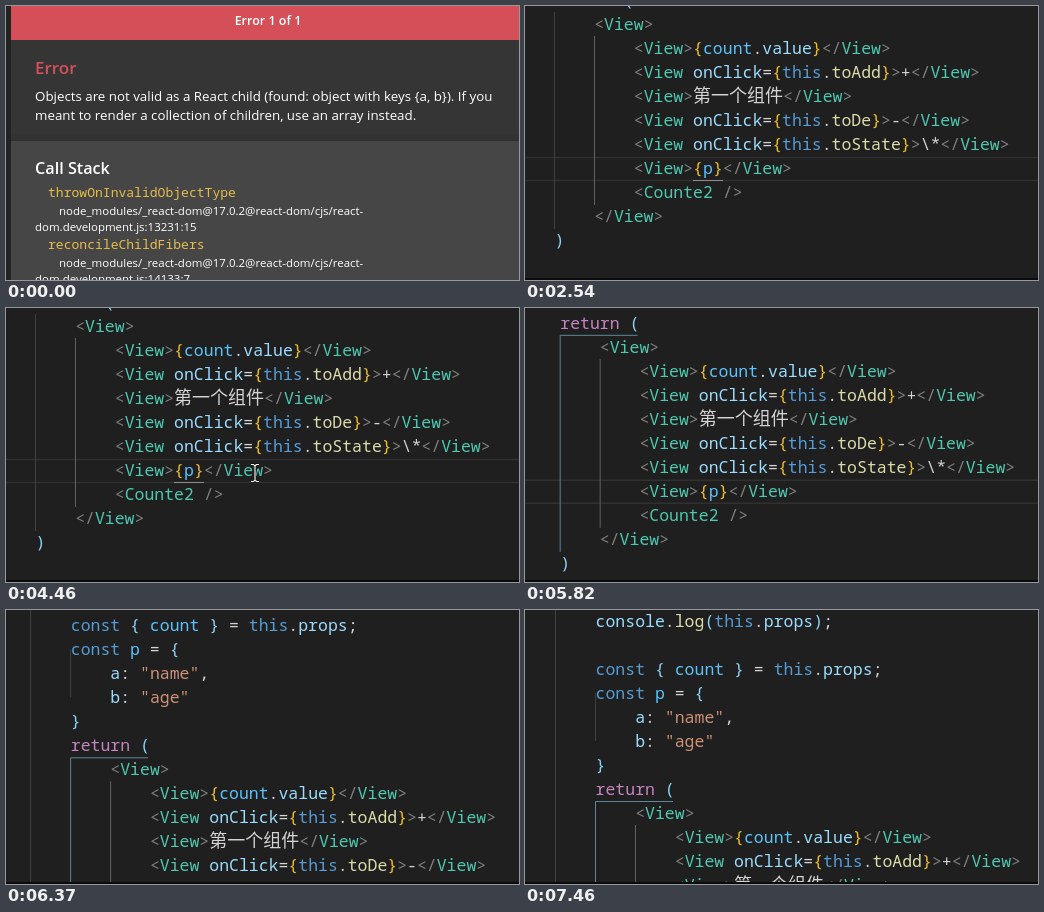
Write an HTML page that moves like this. It is 513 px wide and 274 px high and loops after 8320 ms.

```html
<!DOCTYPE html>
<html lang="en">
<head>
<meta charset="utf-8">
<title>Invalid child error</title>
<style>
  html, body { margin: 0; width: 100%; height: 100%; overflow: hidden; background: #1f1f1f; }
  svg { display: block; width: 513px; height: 274px; }
  text { white-space: pre; }
  .sans { font-family: "Open Sans", "Noto Sans", sans-serif; fill: #fff; }
  .mono { font-family: "Noto Sans Mono", "DejaVu Sans Mono", monospace; }
  .cjk { font-family: "Noto Sans CJK SC", "Noto Sans CJK", sans-serif; font-size: 18px; }
  .bold { font-weight: 600; }
  .body { font-size: 13.33px; }
  .path { font-size: 11.47px; }
  .call { font-size: 13.06px; fill: #e6bd4e; }
  .code { font-size: 16.49px; }
</style>
</head>
<body>
<svg viewBox="0 0 513 274">
  <defs>
    <linearGradient id="edge" x2="0" y2="1">
      <stop stop-color="#353535"/><stop offset="1" stop-color="#303030"/>
    </linearGradient>
  </defs>

  <g id="error">
    <rect width="513" height="274" fill="#464646"/>
    <rect y="34" width="513" height="101" fill="#353535"/>
    <rect y="127" width="513" height="8" fill="url(#edge)"/>
    <rect width="513" height="34" fill="#d44f58"/>
    <rect width="5" height="274" fill="#232323"/>
    <g class="sans">
      <text class="bold" x="262" y="18.5" font-size="12.5" text-anchor="middle">Error 1 of 1</text>
      <text class="bold" x="29" y="68" font-size="17" style="fill:#d4505a">Error</text>
      <text class="body" x="29" y="95">Objects are not valid as a React child (found: object with keys {a, b}). If you</text>
      <text class="body" x="29" y="113.5">meant to render a collection of children, use an array instead.</text>
      <text class="bold" x="29" y="168" font-size="16.2">Call Stack</text>
    </g>
    <g id="stack"></g>
  </g>

  <g id="editor">
    <rect width="513" height="274" fill="#1f1f1f"/>
    <g id="page">
      <path d="M-60 151.5H560M-60 174.5H560" stroke="#303030" stroke-width="1.5"/>
      <path d="M-10.5 -260V290M29.5 -102V-54" stroke="#404040"/>
      <path d="M69.5 30V199" stroke="#626262"/>
      <path id="outer" d="M29.5 6V223" stroke="#404040"/>
      <path id="inner" d="M168 174.5H198" stroke="#8a8a8a"/>
      <path id="active" d="M107 6.5H29.5V223" fill="none" stroke="#5d8797"/>
      <g id="code" class="mono code"></g>
    </g>
    <rect y="272" width="513" height="2" fill="#0b0b0b"/>
    <g id="strip">
      <rect y="269" width="513" height="5" fill="#0b0b0b"/>
      <path d="M0 270.5H390" stroke="#4c211d"/>
      <path d="M216 273H238M266 273H288M296 273H320M345 273H370" stroke="#d9d0c8" stroke-width="2"/>
      <path d="M190 274Q201 268 212 274" fill="#eee" stroke="#c4783a"/>
    </g>
  </g>

  <path id="arrow" d="M.5 .5V15L4 11.7 6.3 17 8.6 16 6.3 10.8H11Z" fill="#fff" stroke="#111"/>
  <g id="ibeam" fill="none">
    <path d="M-4 -8.5H-1.5L0 -7 1.5 -8.5H4M0 -7V7M-4 8.5H-1.5L0 7 1.5 8.5H4" stroke="#111" stroke-width="2.6"/>
    <path d="M-4 -8.5H-1.5L0 -7 1.5 -8.5H4M0 -7V7M-4 8.5H-1.5L0 7 1.5 8.5H4" stroke="#f2f2f2" stroke-width="1.2"/>
  </g>
</svg>

<script>
const LOOP = 8320, COL = 9.895, ROW = 24, FIRST_ROW = -8;
const $ = id => document.getElementById(id);

function addText(parent, cls, x, y, content = '') {
  const node = document.createElementNS('http://www.w3.org/2000/svg', 'text');
  node.setAttribute('class', cls);
  node.setAttribute('x', x);
  node.setAttribute('y', y);
  node.textContent = content;
  parent.append(node);
  return node;
}

[['throwOnInvalidObjectType', '13231:15'], ['reconcileChildFibers', '14133:7']].forEach(([name, at], i) => {
  const y = i * 52, stack = $('stack');
  addText(stack, 'mono call', 42, 191 + y, name);
  addText(stack, 'sans path', 53, 208.5 + y, 'node_modules/_react-dom@17.0.2@react-dom/cjs/react-');
  addText(stack, 'sans path', 29, 224.5 + y, 'dom.development.js:' + at);
});

const source = String.raw`console.log(this.props);

const { count } = this.props;
const p = {
    a: "name",
    b: "age"
}
return (
    <View>
        <View>{count.value}</View>
        <View onClick={this.toAdd}>+</View>
        <View>第一个组件</View>
        <View onClick={this.toDe}>-</View>
        <View onClick={this.toState}>\*</View>
        <View>{p}</View>
        <Counte2 />
    </View>
)`;

const rules = [
  [/^(<\/?|\/?>)$/, '#808080'],
  [/^(View|Counte2)$/, '#4ec9b0'],
  [/^(const|this)$/, '#569cd6'],
  [/^return$/, '#c586c0'],
  [/^"/, '#ce9178'],
  [/^(log|to[A-Z]\w*)$/, '#dcdcaa'],
  [/^(count|p)$/, '#5cc3fa'],
  [/^\w/, '#9cdcfe'],
  [/^[(){}]$/, '#8fd3f8'],
];
const tokens = /<\/?|\/?>|"[^"]*"|\w+|[^\x00-\x7f]+|\s+|./g;

function colorOf(token, row) {
  if (row > 0 && /[{}]/.test(token)) return '#f0c02c';
  const rule = rules.find(([pattern]) => pattern.test(token));
  return rule ? rule[1] : '#d4d4d4';
}

source.split('\n').forEach((line, i) => {
  const row = FIRST_ROW + i, code = line.trimStart();
  const indent = line.length - code.length;
  const text = addText($('code'), '', 29.6 + indent * COL, 24 + row * ROW);
  for (const token of code.match(tokens) || []) {
    const span = document.createElementNS(text.namespaceURI, 'tspan');
    span.textContent = token;
    span.setAttribute('fill', colorOf(token, row));
    if (/[^\x00-\x7f]/.test(token)) span.setAttribute('class', 'cjk');
    text.append(span);
  }
});

// Each move: start, end, number of steps, then points as [x, y, progress].
const arrowMoves = [
  [200, 1020, 11, [283, 12, 0], [440, 238, 1]],
  [1090, 1220, 3, [440, 238, 0], [472, 250, 1]],
];
const ibeamMoves = [
  [2670, 3370, 11, [470, 262, 0], [88, 183, 1]],
  [3440, 4200, 11, [88, 183, 0], [264, 163, .7], [249, 165, 1]],
  [5210, 5490, 5, [249, 165, 0], [123, -12, 1]],
  [7250, 7460, 4, [235, 38, 0], [422, 247, 1]],
];
const panMoves = [
  [5820, 6650, 13, [0, 0, 0], [34, 125, 6 / 13], [38, 182, 1]],
  [6710, 7050, 5, [38, 182, 0], [41, 185, 1]],
];

function follow(moves, t) {
  const move = moves.filter(m => t >= m[0]).pop();
  if (!move) return [0, 0];
  const [from, to, steps, ...points] = move;
  const step = Math.floor((t - from) / (to - from) * (steps - 1) + 1e-6) + 1;
  const k = Math.min(1, step / steps);
  const i = Math.max(1, points.findIndex(p => p[2] >= k - 1e-9));
  const [a, b] = [points[i - 1], points[i]];
  const u = (k - a[2]) / (b[2] - a[2]);
  return [a[0] + (b[0] - a[0]) * u, a[1] + (b[1] - a[1]) * u];
}

const place = (id, moves, t) => $(id).setAttribute('transform', `translate(${follow(moves, t)})`);
const show = (id, on) => $(id).style.display = on ? '' : 'none';

function render(t) {
  const within = (from, to) => t >= from && t < to;
  const clicked = t >= 4530;
  show('error', t < 2540);
  show('editor', t >= 2540);
  show('inner', !clicked);
  show('outer', !clicked);
  show('active', clicked);
  show('strip', within(6160, 6240));
  show('arrow', within(200, 1220));
  show('ibeam', within(2670, 5490) || within(7250, 7460));
  place('page', panMoves, t);
  place('arrow', arrowMoves, t);
  place('ibeam', ibeamMoves, t);
}

const start = performance.now();
function tick() {
  render((performance.now() - start) % LOOP);
  requestAnimationFrame(tick);
}
tick();
</script>
</body>
</html>
```
